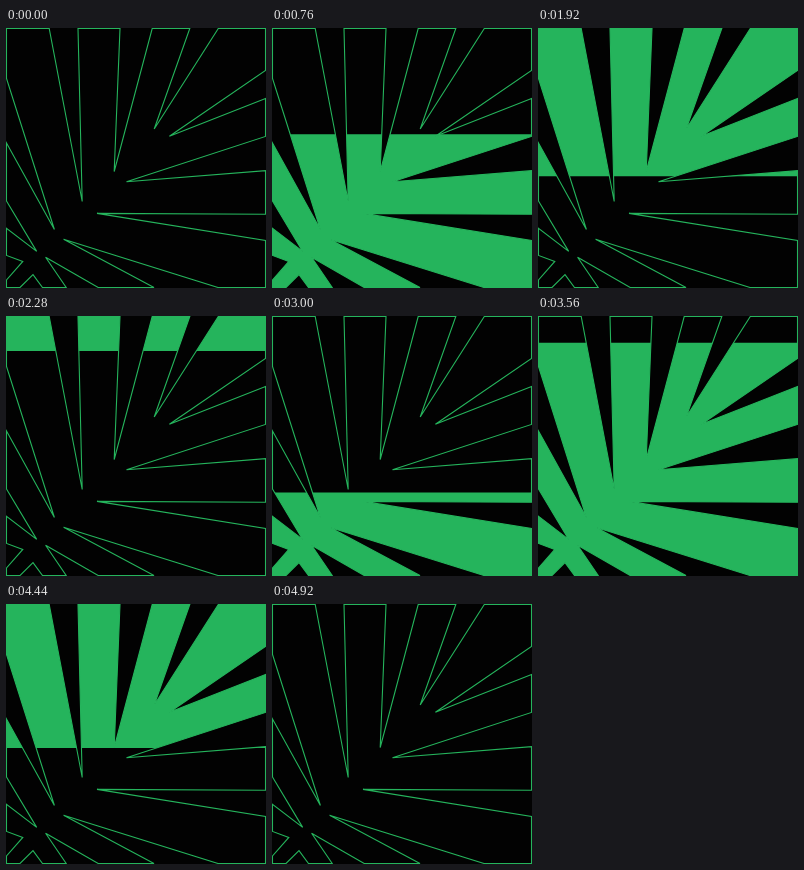
An HTML page for the animation above (5000 ms loop, 260x260 px).

```html
<!DOCTYPE html>
<html lang="en">
<head>
<meta charset="utf-8">
<title>Rays</title>
<style>
  html, body { margin: 0; width: 100%; height: 100%; overflow: hidden; background: #020202; }
  svg { position: absolute; inset: 0; width: 100%; height: 100%; }
  #fill { fill: #25b45c; }
  #line { fill: none; stroke: #25b45c; stroke-width: 1.1; }
</style>
</head>
<body>
<svg id="fill" viewBox="0 0 260 260"><path/></svg>
<svg id="line" viewBox="0 0 260 260"><path/></svg>
<script>
  const LOOP = 5000, STEP = 40, MIN = 0.5, MAX = 259.5;

  // Dark wedges cut into each side, clockwise: base start, tip x, tip y, base end.
  const sides = [
    { corner: [MIN, MIN], base: x => [x, MIN],
      wedges: [[43.2, 76.2, 173.5, 72], [114, 108.2, 143.5, 146.2], [183.8, 148.2, 101, 212.3]] },
    { corner: [MAX, MIN], base: y => [MAX, y],
      wedges: [[42.4, 163.4, 108.2, 70.6], [108.4, 120.5, 153.7, 142.7], [186.2, 91, 185.4, 212.4]] },
    { corner: [MAX, MAX], base: x => [x, MAX],
      wedges: [[212, 57.6, 211.2, 148], [92.2, 39.6, 229.3, 60.2], [36.5, 27, 246.6, 14]] },
    { corner: [MIN, MAX], base: y => [MIN, y],
      wedges: [[252, 16.8, 233.4, 227.4], [200.3, 30.7, 223.4, 173], [115, 48.4, 201.5, 50.5]] }
  ];
  const points = sides.flatMap(({ corner, base, wedges }) =>
    [corner, ...wedges.flatMap(([a, x, y, b]) => [base(a), [x, y], base(b)])]);
  for (const path of document.querySelectorAll("path"))
    path.setAttribute("d", "M" + points.join("L") + "Z");

  // An edge climbs the stage, filling or clearing what lies below it.
  const below = "inset(100% 0% 0% 0%)", whole = "inset(0% 0% 0% 0%)", above = "inset(0% 0% 100% 0%)";
  const sweeps = [
    { from: 80, to: 1200, ease: [.4, .35, .7, .7], shape: [below, whole] },
    { from: 1512, to: 2400, ease: [.4, .32, .7, .715], shape: [whole, above] },
    { from: 2560, to: 3720, ease: [.4, .2, .75, .89], shape: [below, whole] },
    { from: 3992, to: 4920, ease: [.4, .3, .7, .715], shape: [whole, above] }
  ];
  const frames = sweeps.flatMap(({ from, to, ease, shape }) => [
    { offset: from / LOOP, clipPath: shape[0], easing: `cubic-bezier(${ease})` },
    { offset: to / LOOP, clipPath: shape[1] }
  ]);
  const sweep = document.getElementById("fill").animate(
    [{ offset: 0, clipPath: below }, ...frames, { offset: 1, clipPath: above }],
    { duration: LOOP, fill: "both" });
  sweep.pause();

  const start = performance.now();
  function tick() {
    const t = (performance.now() - start) % LOOP;
    sweep.currentTime = Math.floor(t / STEP) * STEP;
    requestAnimationFrame(tick);
  }
  tick();
</script>
</body>
</html>
```
